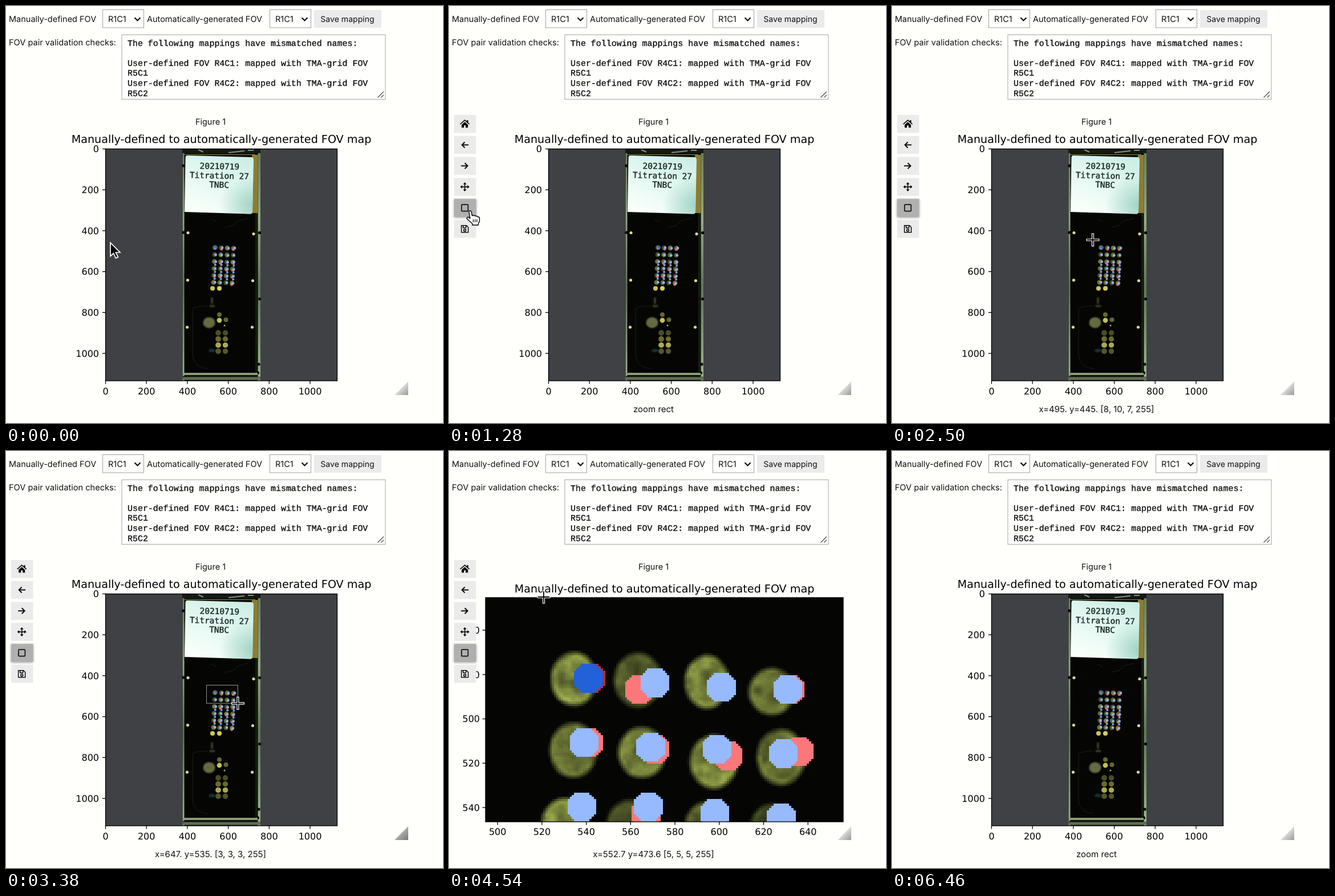
Write an HTML page with a canvas that moves like this. It is 766 by 731 pixels and loops after 6480 ms.

```html
<!DOCTYPE html>
<html lang="en">
<head>
<meta charset="utf-8">
<title>FOV mapping</title>
<style>
html, body { margin: 0; width: 100%; height: 100%; overflow: hidden; background: #fffffc; }
#stage { position: relative; width: 766px; height: 731px; overflow: hidden; }
#clip { position: absolute; left: 64px; top: 257px; width: 627px; height: 393px; overflow: hidden; background: #050604; }
#tissue { position: absolute; image-rendering: pixelated; }
svg { position: absolute; left: 0; top: 0; }
text { white-space: pre; text-rendering: geometricPrecision; }
.ui { font: 14.5px Inter, "Open Sans", sans-serif; fill: #111; }
.mono { font: 14.95px "Liberation Mono", monospace; fill: #111; stroke: #111; stroke-width: .35; }
.tick { font: 16px "DejaVu Sans", sans-serif; }
.title { font: 19.15px "DejaVu Sans", sans-serif; text-anchor: middle; }
.label { font: 14.4px "DejaVu Sans Mono", monospace; fill: #1c2826; stroke: #1c2826; stroke-width: .4; text-anchor: middle; }
#status { font-size: 15px; }
.mid { text-anchor: middle; }
.end { text-anchor: end; }
.line { fill: none; stroke: #111; stroke-width: 1.7; }
.axis { fill: none; stroke: #000; stroke-width: 1.3; }
.button { fill: #ebebeb; }
.button.on { fill: #b0b0b0; filter: drop-shadow(0 1px 2px #0006); }
</style>
</head>
<body>
<div id="stage">
<div id="clip"><canvas id="tissue"></canvas></div>
<svg id="svg" width="766" height="731" viewBox="0 0 766 731">
  <defs>
    <linearGradient id="paper" x1=".75" y1="0" x2=".25" y2="1">
      <stop offset="0" stop-color="#cdeee4"/><stop offset=".45" stop-color="#e2f8f0"/>
      <stop offset="1" stop-color="#fafffc"/>
    </linearGradient>
    <radialGradient id="shade" cx="1" cy=".85" r=".5">
      <stop offset="0" stop-color="#8cc8b8" stop-opacity=".8"/><stop offset="1" stop-color="#8cc8b8" stop-opacity="0"/>
    </radialGradient>
    <linearGradient id="rail" x1="0" y1="0" x2="0" y2="1">
      <stop offset="0" stop-color="#66805a"/><stop offset=".3" stop-color="#93aa86"/>
      <stop offset=".6" stop-color="#5e7656"/><stop offset="1" stop-color="#9db692"/>
    </linearGradient>
    <linearGradient id="grip" x1="0" y1="0" x2="1" y2="1">
      <stop offset=".35" stop-color="#eee"/><stop offset="1" stop-color="#999"/>
    </linearGradient>
    <filter id="soft" x="-50%" y="-50%" width="200%" height="200%"><feGaussianBlur stdDeviation="1.3"/></filter>
    <clipPath id="frame"><rect x="174.5" y="250.5" width="406" height="406.5"/></clipPath>
  </defs>

  <text class="ui" x="5" y="28">Manually-defined FOV</text>
  <text class="ui" x="247" y="28">Automatically-generated FOV</text>
  <g id="selects"></g>
  <rect class="button" x="540" y="7" width="118" height="31"/>
  <text class="ui mid" x="598.5" y="28" style="font-size:14.1px">Save mapping</text>
  <text class="ui" x="5" y="69" style="font-size:14.6px">FOV pair validation checks:</text>
  <rect x="203" y="50.5" width="462" height="113" fill="#fffffe" stroke="#a6a6a6"/>
  <g id="report"></g>
  <path d="M651.5 160.5L662 150M657.5 160.5L662 156" fill="none" stroke="#444" stroke-width="1.1"/>
  <text class="ui mid" x="358.5" y="208">Figure 1</text>

  <g id="overview">
    <text class="title" x="377.5" y="240">Manually-defined to automatically-generated FOV map</text>
    <rect x="174.5" y="250.5" width="406" height="406.5" fill="#404144"/>
    <g clip-path="url(#frame)">
      <rect x="309" y="250" width="137" height="407" fill="#050604"/>
      <rect x="309.5" y="250" width="3" height="407" fill="url(#rail)"/>
      <rect x="441.5" y="250" width="4.5" height="407" fill="url(#rail)"/>
      <path d="M438.5 363V643" stroke="#29351f" stroke-width="1.5"/>
      <path d="M309 254H446" stroke="#121a12" stroke-width="8"/>
      <path d="M337 252l9 4M390 257l28-3M424 253h10" stroke="#81918a" stroke-width="2"/>
      <path d="M312 260.5H437" stroke="#767338" stroke-width="1.5"/>
      <path d="M431 261H441.5V363H431Z" fill="#8c7d32"/>
      <g id="paperShape">
        <path id="card" d="M318 262L430 265Q434 265 434 270L432 360Q432 365 427 364.5L313 361L314.5 266Q314.5 262 318 262Z" fill="url(#paper)"/>
        <path d="M318 262L430 265Q434 265 434 270L432 360Q432 365 427 364.5L313 361L314.5 266Q314.5 262 318 262Z" fill="url(#shade)"/>
      </g>
      <g transform="rotate(1.3 374 298)">
        <text class="label" x="374" y="286">20210719</text>
        <text class="label" x="374" y="302.5">Titration 27</text>
        <text class="label" x="374" y="318.5">TNBC</text>
      </g>
      <path d="M327 531Q330 526 354 526M327 531V612Q329 633 354 636M360 374l9 4M384 388l14-3 8-8 18-5" fill="none" stroke="#1b1f14" stroke-width="1"/>
      <path d="M361 511v11m-4 4h9" stroke="#444b2b" stroke-width="3" filter="url(#soft)"/>
      <ellipse cx="356" cy="555" rx="10.5" ry="9.5" fill="#656a40" filter="url(#soft)"/>
      <ellipse cx="361" cy="604" rx="6" ry="3" fill="#18352a" filter="url(#soft)"/>
      <g id="spots"></g>
      <path d="M310 645H441" stroke="#8d9b76" stroke-width="4"/>
      <path d="M310 652.5H446" stroke="#5e6f50" stroke-width="6"/>
      <path d="M310 649.5H441" stroke="#151b10" stroke-width="2"/>
    </g>
    <g id="overviewAxes"></g>
    <rect id="band" fill="none" stroke="#929292"/>
  </g>

  <g id="zoomed">
    <text class="title" x="377.5" y="248">Manually-defined to automatically-generated FOV map</text>
    <g id="zoomedAxes"></g>
  </g>

  <path id="corner" d="M681 682L705 658V682Z" fill="url(#grip)"/>
  <text id="status" class="ui mid" x="358.5" y="711.5"></text>
  <g id="toolbar"></g>

  <g id="arrow">
    <path d="M0 0V23.5L5.5 18.5L9.5 27L13.5 25L9.5 17H17Z" fill="#000" stroke="#fff" stroke-width="1.7"/>
  </g>
  <g id="hand">
    <path d="M-2 2Q-2 0 0 0Q2 0 2.3 2L3.5 8.5Q5 7 6.5 8.8Q8.5 7.5 10 9.5Q12 8.5 13.3 10.5Q16 10 16.5 13V17Q16.5 20 14.5 22V25H4V22.5Q0 19 -4 15.5Q-7 13 -5 11.5Q-3 10.5 0 13.5Z" fill="#fff" stroke="#000" stroke-width="1.4" stroke-linejoin="round"/>
    <path d="M5.5 15v5M8.7 15v5M11.9 15v5" stroke="#000" stroke-width="1.2"/>
  </g>
  <g id="cross">
    <path d="M-11.5 0H11.5M0-11.5V11.5" stroke="#fff" stroke-width="4.2"/>
    <path d="M-10.3 0H10.3M0-10.3V10.3" stroke="#000" stroke-width="1.8"/>
  </g>
</svg>
</div>
<script>
const LOOP = 6480;
const $ = id => document.getElementById(id);
const add = (id, markup) => $(id).insertAdjacentHTML('beforeend', markup);
const show = (id, on) => { $(id).style.display = on ? '' : 'none'; };
const range = (n, f) => Array.from({ length: n }, (_, i) => f(i));

// Form controls
for (const x of [169.5, 462.5]) add('selects', `
  <rect x="${x}" y="6.5" width="72" height="31.5" fill="#fffffe" stroke="#a0a0a0"/>
  <text class="ui" x="${x + 9.5}" y="28">R1C1</text>
  <path d="M${x + 56} 20.5l5 5 5-5" fill="none" stroke="#111" stroke-width="2.2"/>`);

['The following mappings have mismatched names:', '',
  'User-defined FOV R4C1: mapped with TMA-grid FOV', 'R5C1',
  'User-defined FOV R4C2: mapped with TMA-grid FOV', 'R5C2'
].forEach((s, i) => add('report', `<text class="mono" x="213" y="${69.5 + i * 17.6}">${s}</text>`));

// Axes
const wide = { left: 174.5, top: 250.5, right: 580.5, bottom: 657, x0: 0, y0: 0, k: .3585 };
const near = { left: 64, top: 257, right: 691, bottom: 650, x0: 494.55, y0: 445.3, k: 3.886 };

function drawAxes(id, a, xs, ys, labelY, labelX) {
  add(id, `<rect class="axis" x="${a.left}" y="${a.top}" width="${a.right - a.left}" height="${a.bottom - a.top}"/>`);
  for (const v of xs) {
    const x = a.left + (v - a.x0) * a.k;
    add(id, `<path class="axis" d="M${x} ${a.bottom}v5.5"/><text class="tick mid" x="${x}" y="${labelY}">${v}</text>`);
  }
  for (const v of ys) {
    const y = a.top + (v - a.y0) * a.k;
    add(id, `<path class="axis" d="M${a.left} ${y}h-5.5"/><text class="tick end" x="${labelX}" y="${y + 5.8}">${v}</text>`);
  }
}
const hundreds = range(6, i => i * 200);
drawAxes('overviewAxes', wide, hundreds, hundreds, 681, 163);
drawAxes('zoomedAxes', near, range(8, i => 500 + i * 20), range(5, i => 460 + i * 20), 673, 54);

// Spots on the slide
let seed = 7;
const rand = () => (seed = seed * 16807 % 2147483647) / 2147483647;
const dot = (x, y, r, fill) => add('spots', `<circle cx="${x}" cy="${y}" r="${r}" fill="${fill}"/>`);

for (const [x, y] of [[319, 397.5], [434, 399.5], [318.5, 480.5], [432.5, 481.5], [317.5, 563], [431.5, 563]]) dot(x, y, 2.6, '#ddd594');
for (const [x, y] of [[311, 280], [311, 397], [444.5, 397.5], [444.5, 513.5], [443, 628], [441.5, 643]]) dot(x, y, 2.6, '#000');

for (let r = 0; r < 6; r++) for (let c = 0; c < 4; c++) {
  const x = 366.3 + c * 10.8 - r * .5, y = 423.5 + r * 12.2 + c * .4;
  dot(x, y, 4.2, ['#5f6832', '#474d26', '#6d7539'][(r + c) % 3]);
  const red = (r === 3 || r === 4 || c % 2) && rand() < .65;
  if (red) dot(x + 1.5 - rand() * 3, y + 1 + rand() * 2, 2.3, '#e86664');
  dot(x + 1 + rand() * 1.6, y - .8 + rand() * 1.6, 2.3, '#91b3f4');
  if (r > 1 && r < 5) dot(x + 1.5, y + 5.8, 2, '#7f9fe4');
}
dot(368.6, 423.5, 2.4, '#2f68d4');
dot(362, 495, 4.1, '#c9c45a');
dot(374, 495, 4.1, '#d2cd62');
dot(374, 541, 4, '#66682f');
dot(374, 551, 4.4, '#c2c058');
dot(385.5, 550, 4, '#66662f');
dot(383, 560, 1.5, '#b6ae62');
['#4c4d25', '#6a6930', '#aba750', '#55562f'].forEach((fill, i) => {
  dot(372, 573 + i * 10.7, 4.9, fill);
  dot(384.5, 573 + i * 10.7, 4.7, fill);
});

// Magnified tissue: one canvas pixel per image pixel
const COLS = 162, ROWS = 103, LEFT = 63.6, TOP = 253.2;
const cores = [ // x, y, rx, ry, brightness
  [219, 400, 41, 47, 1], [331, 402, 42, 48, .62], [452, 405, 39, 47, .95], [566, 422, 41, 41, .8],
  [218, 525, 42, 48, .78], [338, 529, 42, 45, .9], [464, 545, 42, 47, .98], [582, 537, 43, 49, .8],
  [204, 652, 42, 43, 1.1], [318, 656, 42, 44, .55], [452, 656, 38, 41, .7], [566, 660, 38, 41, .55]];
const reds = [[69, 42], [137, 42], [46, 66], [76, 69], [109, 72], [141, 70], [72, 98]];
const rowY = [[37, 39, 41, 42], [66, 68, 69, 71], [95, 95, 98, 100]];

// Smooth noise on a coarse random lattice
const lattice = range(1024, rand);
function noise(x, y) {
  const i = Math.floor(x), j = Math.floor(y);
  const ease = u => u * u * (3 - 2 * u), u = ease(x - i), v = ease(y - j);
  const at = (a, b) => lattice[(a + b * 37) % 1024];
  const top = at(i, j) * (1 - u) + at(i + 1, j) * u;
  const low = at(i, j + 1) * (1 - u) + at(i + 1, j + 1) * u;
  return top * (1 - v) + low * v - .5;
}

function drawTissue() {
  const c = $('tissue'), g = c.getContext('2d');
  c.width = COLS; c.height = ROWS;
  c.style.cssText = `left:${LEFT - near.left}px;top:${TOP - near.top}px;width:${COLS * near.k}px;height:${ROWS * near.k}px`;
  for (let j = 0; j < ROWS; j++) for (let i = 0; i < COLS; i++) {
    const x = LEFT + (i + .5) * near.k, y = TOP + (j + .5) * near.k;
    const blot = noise(x / 15, y / 15) + .4 * noise(x / 7, y / 7);
    let b = 0;
    for (const [cx, cy, rx, ry, light] of cores) {
      const d = Math.hypot((x - cx) / rx, (y - cy) / ry);
      const edge = Math.min(1, Math.max(0, (1.09 - d) / .24));
      b = Math.max(b, edge * light * (.68 + .26 * d * d + .38 * blot));
    }
    g.fillStyle = `rgb(${5 + 146 * b},${6 + 160 * b},${4 + 70 * b})`;
    g.fillRect(i, j, 1, 1);
  }
  const octagon = (cx, cy, fill) => {
    g.fillStyle = fill;
    for (let dy = -6; dy <= 6; dy++) {
      const w = Math.min(6, 9 - Math.abs(dy));
      g.fillRect(cx - w, cy + dy, 2 * w + 1, 1);
    }
  };
  octagon(47, 37, '#cf2222');
  for (const [x, y] of reds) octagon(x, y, '#fb7779');
  rowY.forEach((ys, r) => ys.forEach((y, i) =>
    octagon([46, 44, 43][r] + i * 30, y, r + i ? '#97b9fd' : '#2261d8')));
}
drawTissue();

// Toolbar
const buttonY = i => 191 + i * 36.8;
[
  '<path class="line" d="M-8 .5L0-6.5L8 .5"/><path d="M-5.5 1.5L0-3.5L5.5 1.5V6.5H1.5V2.5H-1.5V6.5H-5.5ZM3.5-6.5h2.5v4.5l-2.5-2z"/>',
  '<path class="line" style="stroke-width:2" d="M6.5 0H-5M0-5L-5 0L0 5"/>',
  '<path class="line" style="stroke-width:2" d="M-6.5 0H5M0-5L5 0L0 5"/>',
  '<path class="line" d="M-6 0H6M0-6V6"/><path d="M-8 0l3.5-3v6zM8 0l-3.5-3v6zM0-8l-3 3.5h6zM0 8l-3-3.5h6z"/>',
  '<rect class="line" x="-5.7" y="-5.7" width="11.4" height="11.4" rx="1"/>',
  '<path class="line" style="stroke-width:1.5" d="M-6-6H3L6-3V6H-6ZM-3-6V-2H2V-6"/><circle class="line" cy="2.2" r="1.9"/>'
].forEach((icon, i) => add('toolbar', `
  <rect id="button${i}" class="button" x="9" y="${buttonY(i)}" width="38.5" height="31.5"/>
  <g transform="translate(27.7 ${buttonY(i) + 15.7})">${icon}</g>`));

// Pointer path: time, x, y
const path = [
  [0, 183, 415], [120, 180, 414], [420, 100, 390], [800, 37, 359], [1400, 37, 359],
  [1750, 150, 385], [2200, 352, 410], [2660, 352, 410], [3270, 406.4, 442.3], [3390, 406.4, 442.3],
  [3480, 409, 446], [4300, 409, 446], [4440, 290, 367], [4540, 166, 256], [4660, 166, 256],
  [5150, 37, 213], [5850, 37, 213], [6200, -30, 195], [LOOP, -30, 195]];
const ON = 1050, PRESS = 2660, RELEASE = 3480, ZOOM = 3580, HOME = 5400, RESET = 5680;
const LAG = 100;

function pointer(t) {
  const i = Math.max(1, path.findIndex(p => p[0] >= t));
  const [t0, x0, y0] = path[i - 1], [t1, x1, y1] = path[i];
  const u = Math.max(0, (t - t0) / (t1 - t0)), e = u * u * (3 - 2 * u);
  return [x0 + (x1 - x0) * e, y0 + (y1 - y0) * e];
}

const inside = (a, x, y, pad = 0) =>
  x >= a.left - pad && x <= a.right + pad && y >= a.top - pad && y <= a.bottom + pad;

function statusText(t, a) {
  if (t < ON) return '';
  const [px, py] = pointer(t - LAG);
  if (t > RESET || !inside(a, px, py)) return 'zoom rect';
  const x = a.x0 + (px - a.left) / a.k, y = a.y0 + (py - a.top) / a.k;
  const rgb = x < 376 || x > 757 ? '64, 64, 64' : x < 510 ? '8, 10, 7' : x > 600 ? '3, 3, 3' : '5, 5, 5';
  const form = v => a === near ? v.toFixed(1) : Math.round(v) + '.';
  return `x=${form(x)} y=${form(y)} [${rgb}, 255]`;
}

function draw(t) {
  const [x, y] = pointer(t);
  const zoomed = t >= ZOOM && t < RESET, axes = zoomed ? near : wide;
  show('clip', zoomed);
  show('zoomed', zoomed);
  show('overview', !zoomed);
  show('toolbar', t > 200 && t < 6150);
  $('button4').classList.toggle('on', t >= ON);
  $('button0').classList.toggle('on', t >= HOME);
  $('status').textContent = statusText(t, axes);
  $('corner').style.filter = t >= 3320 && t < ZOOM ? 'brightness(.78)' : '';

  show('band', t > PRESS && t < ZOOM);
  const [bx, by] = pointer(Math.min(t, RELEASE));
  const band = { x: 351.5, y: 410.5, width: Math.max(0, bx - 351.5), height: Math.max(0, by - 410.5) };
  for (const key in band) $('band').setAttribute(key, band[key]);

  const overButton = x >= 9 && x <= 47.5 && y >= 191 && y <= 407 && (y - 191) % 36.8 <= 31.5;
  const kind = overButton ? 'hand' : t >= ON && inside(axes, x, y, 3) ? 'cross' : 'arrow';
  for (const id of ['arrow', 'hand', 'cross']) show(id, id === kind);
  $(kind).setAttribute('transform', `translate(${x} ${y})`);
}

const start = performance.now();
function tick() {
  draw((performance.now() - start) % LOOP);
  requestAnimationFrame(tick);
}
tick();
</script>
</body>
</html>
```
